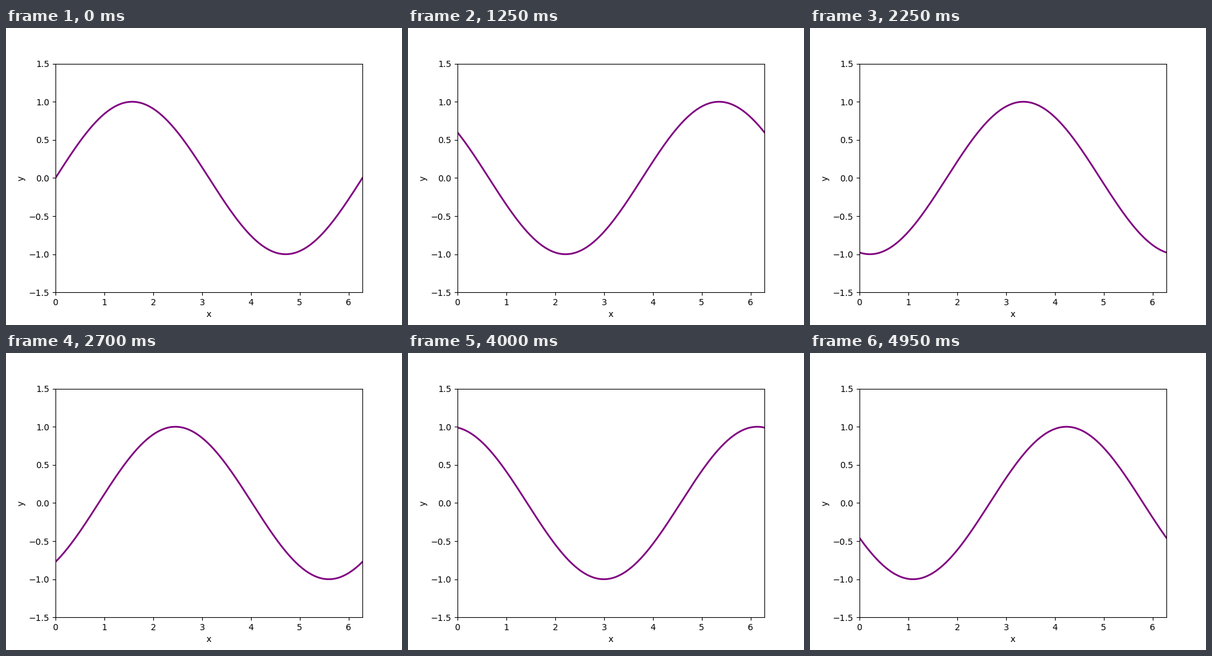
A matplotlib script for the animation above (5000 ms loop, 640 px wide and 480 px high).

```python
import numpy as np
import matplotlib.pyplot as plt
from matplotlib.animation import FuncAnimation

FRAMES = 100
INTERVAL = 50       # ms
PHASE_STEP = 0.1    # radians per frame

fig, ax = plt.subplots(figsize=(6.4, 4.8), dpi=100)
ax.set_xlim(0, 2 * np.pi)
ax.set_ylim(-1.5, 1.5)
ax.set_xlabel("x")
ax.set_ylabel("y")

x = np.linspace(0, 2 * np.pi, 200)
line, = ax.plot(x, np.sin(x), color="purple", lw=2)


def update(frame):
    line.set_ydata(np.sin(x + PHASE_STEP * frame))
    return line,


anim = FuncAnimation(fig, update, frames=FRAMES, interval=INTERVAL,
                     repeat=True, repeat_delay=0)
plt.show()
```
